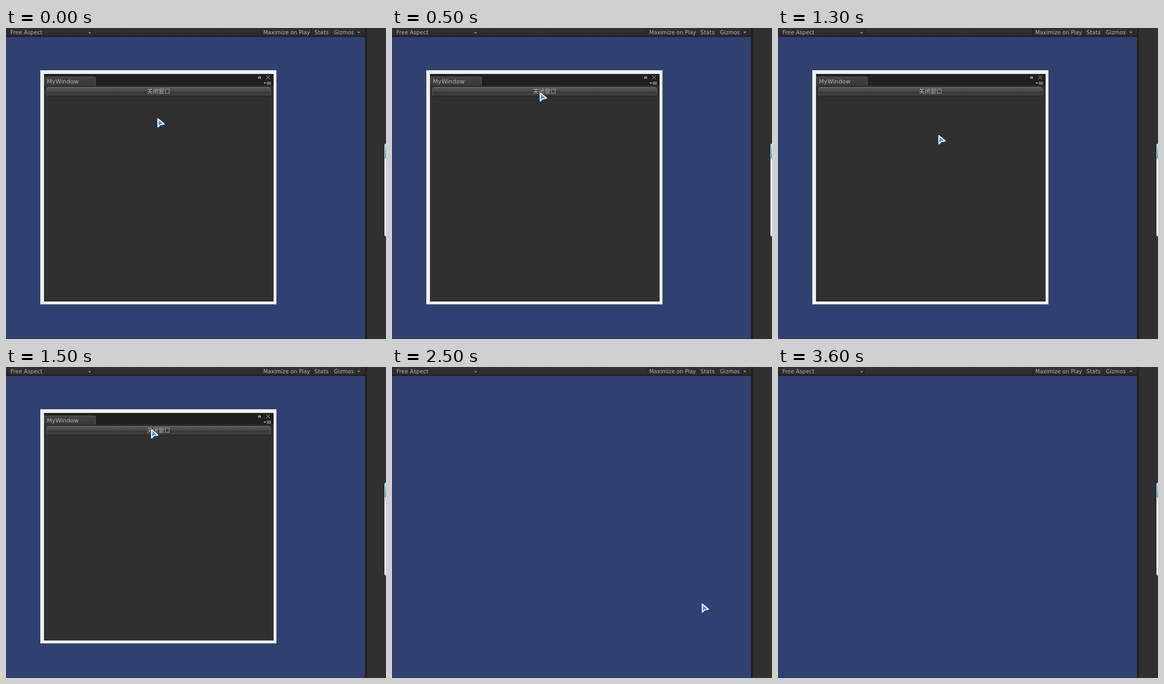
An HTML page that plays this animation: 720 px wide and 589 px high, repeating every 4 s.

```html
<!DOCTYPE html>
<html lang="en">
<head>
<meta charset="utf-8">
<title>Editor window</title>
<style>
html, body { margin: 0; width: 100%; height: 100%; overflow: hidden; background: #303030; }
svg { display: block; width: 100%; height: 100%; }
text { font: 10px "DejaVu Sans", sans-serif; fill: #b2b2b2; letter-spacing: .1px; }
.tab { font-size: 11px; }
.cjk { font: 11px "Noto Sans CJK SC", "Noto Sans CJK", sans-serif; letter-spacing: 0; text-anchor: middle; }
.crisp { shape-rendering: crispEdges; }
</style>
</head>
<body>
<svg viewBox="0 0 720 589">
  <defs>
    <linearGradient id="bar" x2="0" y2="1">
      <stop stop-color="#323232"/><stop offset="1" stop-color="#2d2d2d"/>
    </linearGradient>
    <linearGradient id="tab" x2="0" y2="1">
      <stop stop-color="#444"/><stop offset="1" stop-color="#383838"/>
    </linearGradient>
    <linearGradient id="button" x2="0" y2="1">
      <stop stop-color="#545454"/><stop offset=".5" stop-color="#484848"/>
      <stop offset=".5" stop-color="#3a3a3a"/><stop offset="1" stop-color="#404040"/>
    </linearGradient>
    <linearGradient id="arrow" x2="0" y2="1">
      <stop stop-color="#b4c8e2"/><stop offset=".5" stop-color="#5c8cc0"/><stop offset="1" stop-color="#2c68a8"/>
    </linearGradient>
    <linearGradient id="title" x2="0" y2="1">
      <stop stop-color="#a8dcec"/><stop offset="1" stop-color="#3c98bc"/>
    </linearGradient>
    <filter id="glow" x="-50%" y="-50%" width="200%" height="200%">
      <feGaussianBlur stdDeviation=".6"/>
    </filter>
  </defs>

  <g class="crisp">
    <path fill="#303030" d="M0 0H720V589H0z"/>
    <path fill="url(#bar)" d="M0 0H680V13H0z"/>
    <path fill="#202020" d="M0 13H680V17H0zM680 0H684V589H680z"/>
    <path fill="#292929" d="M0 13H680V15H0z"/>
    <path fill="#304070" d="M0 17H680V588H0z"/>
    <path fill="#26345c" d="M0 588H680V589H0z"/>
    <path stroke="#1e1e1e" d="M3.5 0V13M163.5 0V13M482.5 0V13M579.5 0V13M616.5 0V13M663.5 0V13M674.5 0V13"/>
  </g>
  <path fill="#999" d="M156 8h5l-2.5 3zM666 7h5l-2.5 3z"/>
  <text x="8.5" y="12" style="letter-spacing:.2px">Free Aspect</text>
  <text x="487.5" y="12">Maximize on Play</text>
  <text x="584.5" y="12" style="letter-spacing:.3px">Stats</text>
  <text x="621.5" y="12">Gizmos</text>

  <g id="popup">
    <rect x="716.5" y="218.5" width="20" height="177" rx="4" fill="#f2f2f2" stroke="#1c2428"/>
    <path fill="url(#title)" d="M718 247V222q0-2 2-2.5V247z"/>
    <path fill="none" stroke="#d4eef6" d="M717.5 247V223q0-3 3-4"/>
  </g>

  <g id="window">
    <g class="crisp">
      <path fill="#858585" d="M65 80H513V524H65z"/>
      <path fill="#f0f0f0" d="M65 80H512V523H65z"/>
      <path fill="#303030" d="M72 87H507V518H72z"/>
      <path fill="#202020" d="M72 87H507V109H72z"/>
    </g>
    <path fill="url(#tab)" d="M72 109V92H167q3 0 3 3V109z"/>
    <path fill="none" stroke="#555" d="M72 92.5H167q2.5 0 2.5 3V108"/>
    <text class="tab" x="77.5" y="105">MyWindow</text>
    <g fill="none" stroke="#b0b0b0">
      <path class="crisp" d="M478 92h5M478 93h5M478.5 92V96M482.5 92V96M478 95.5h5M494 102.5h8M494 104.5h8M494 106.5h8"/>
      <path d="M493 90l7 7M500 90l-7 7"/>
    </g>
    <path fill="#b0b0b0" d="M488 103h5l-2.5 3z"/>
    <rect x="75.5" y="112" width="427" height="17.5" rx="3.5" fill="#222"/>
    <rect x="76.5" y="112.5" width="425" height="16" rx="3" fill="url(#button)" stroke="#5c5c5c"/>
    <path stroke="#2a2a2a" d="M79 128.5H500"/>
    <path stroke="#777" d="M79 112.5H499"/>
    <text class="cjk" x="289" y="124">关闭窗口</text>
  </g>

  <g id="cursor" stroke-linejoin="round">
    <path d="M2.8 3L3 18.8L7.6 14.6L15 13.2z" fill="#174f88" stroke="#174f88" stroke-width="4" filter="url(#glow)"/>
    <path d="M2.8 2.8L3 18.3L7.4 14L14.6 12.7z" fill="url(#arrow)" stroke="#f6faff" stroke-width="2"/>
  </g>
</svg>
<script>
const STEP = 500, LOOP = 4000;
// Pointer position for each half second; it is hidden afterwards.
const stops = [[285, 169], [278, 120], [302, 201], [273, 116], [278, 123], [585, 446]];
const [popup, win, cursor] = ["popup", "window", "cursor"].map(id => document.getElementById(id));
const show = (el, on) => el.setAttribute("visibility", on ? "visible" : "hidden");

function draw(now) {
  const t = now % LOOP;
  const stop = stops[Math.floor(t / STEP)];
  show(win, t < 2000);
  show(popup, t < 2000 || t >= 3000);
  show(cursor, stop);
  if (stop) cursor.setAttribute("transform", `translate(${stop})`);
}

const start = performance.now();
function tick() {
  draw(performance.now() - start);
  requestAnimationFrame(tick);
}
tick();
</script>
</body>
</html>
```
